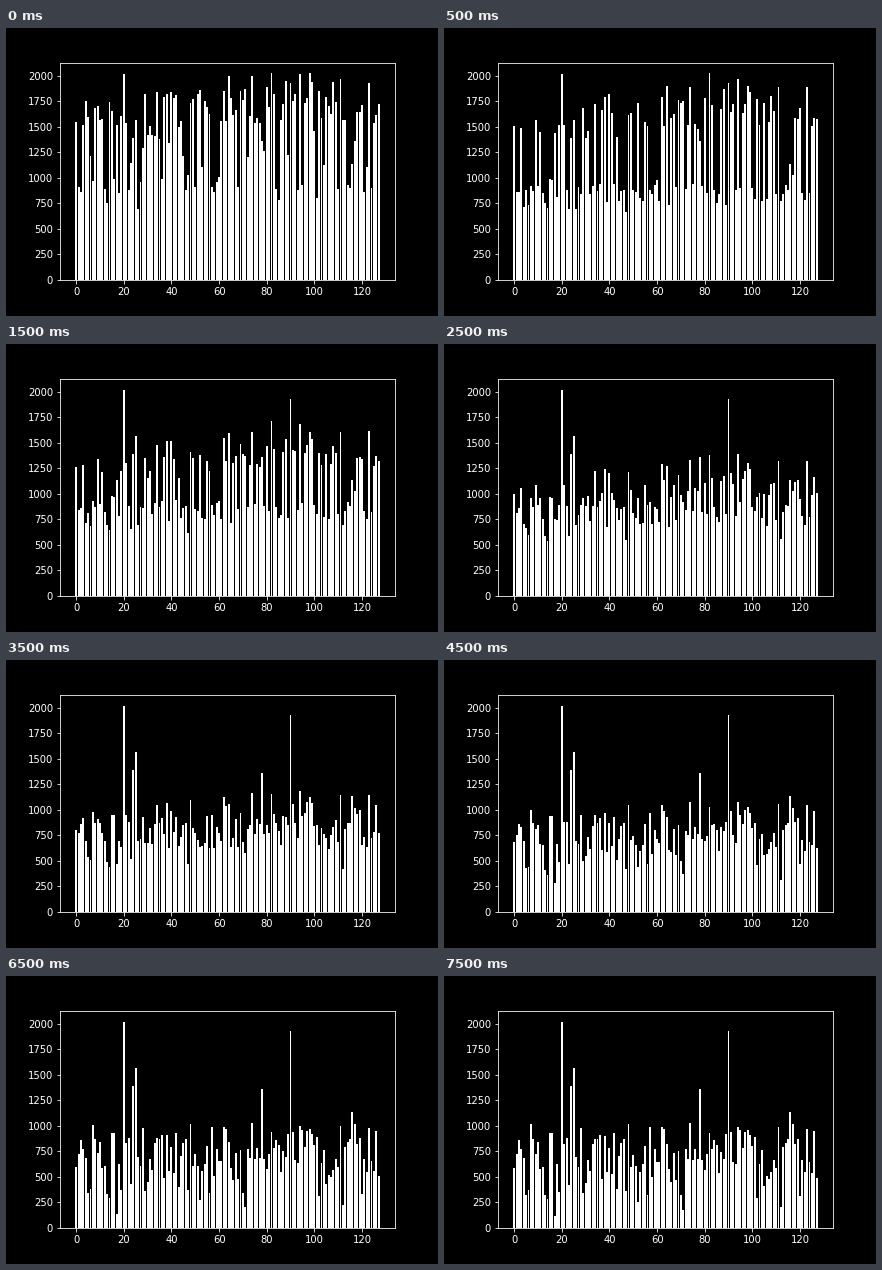
Write a matplotlib script that moves like this. It is 432 px wide and 288 px high and loops after 8 s.

```python
import numpy as np
import matplotlib.pyplot as plt
from matplotlib.animation import FuncAnimation

FRAMES, INTERVAL = 16, 500
COUNT, PEAK = 128, 2030

# Bars that hold their height
STEADY = {2: 865, 20: 2017, 22: 880, 24: 1390, 25: 1570,
          26: 700, 78: 1360, 90: 1930, 116: 1135}

rng = np.random.default_rng(20)


def pick(share, low, high, other=(0, 0)):
    """Give a share of the bars one range of values and the rest another."""
    chosen = rng.random(COUNT) < share
    return np.where(chosen, rng.uniform(low, high, COUNT),
                    rng.uniform(*other, COUNT))


settled = np.maximum(100, 1025 * rng.random(COUNT) ** 0.45)
middle = 850 + 0.2 * (settled - 700) + rng.normal(0, 70, COUNT)
surge = pick(0.42, 600, 1060)
kick = np.where(surge > 0, rng.uniform(20, 150, COUNT),
                pick(0.45, 300, 1050, (0, 50)))


def decay(k, span, power):
    return np.exp(-((k - 1) / span) ** power)


def heights(k):
    """Jump after the first step, then sink: tall bars fast, the rest slowly."""
    step = max(k, 1)
    h = (settled + (middle - settled) * decay(step, 6.2, 1.7)
         + surge * decay(step, 4.2, 1.4))
    if k == 0:
        h = h + kick
    h = np.minimum(h, PEAK)
    h[list(STEADY)] = list(STEADY.values())
    return h


plt.style.use("dark_background")
plt.rcParams.update({"font.family": "DejaVu Sans", "font.size": 10})
fig, ax = plt.subplots(figsize=(6, 4), dpi=72)
fig.subplots_adjust(left=0.125, right=0.9, bottom=0.125, top=0.88)
bars = ax.bar(np.arange(COUNT), heights(0), color="white")
ax.set_ylim(0, PEAK * 1.05)
ax.set_xticks(range(0, 121, 20))
ax.set_yticks(range(0, 2001, 250))


def update(k):
    for bar, h in zip(bars, heights(k)):
        bar.set_height(h)
    return bars


anim = FuncAnimation(fig, update, frames=FRAMES, interval=INTERVAL,
                     repeat=True, repeat_delay=0, blit=False)
plt.show()
```
